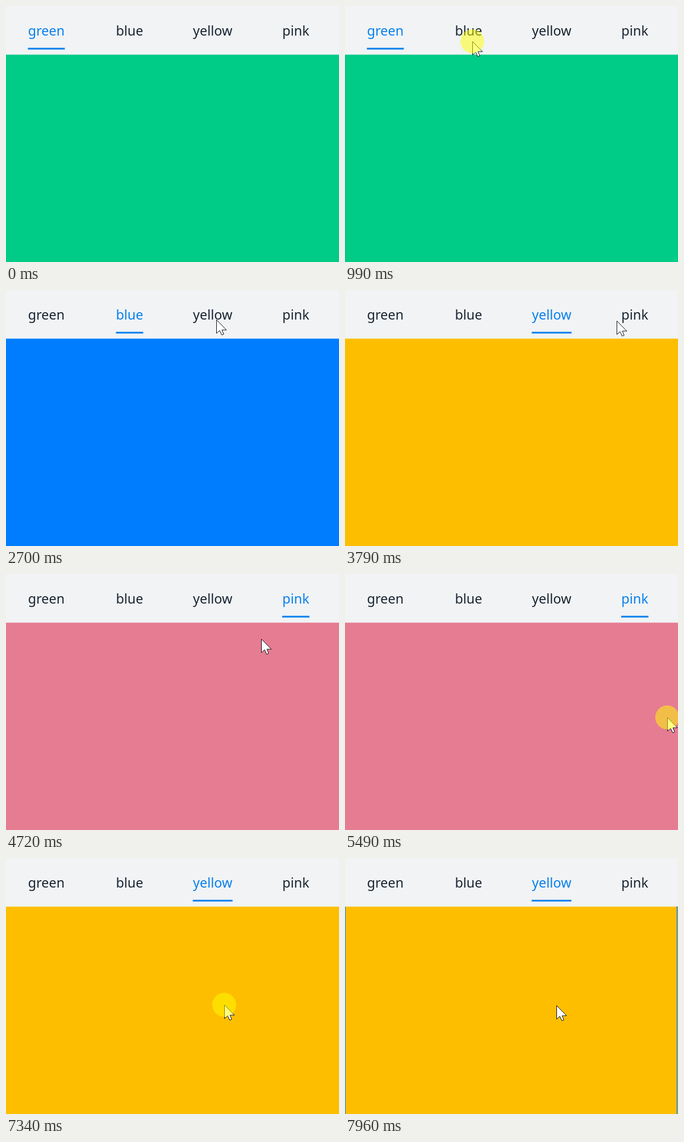
Recreate the animation shown at these times as an HTML page. Size 586 by 450 pixels, loop 8 s.

```html
<!DOCTYPE html>
<html lang="en">
<head>
<meta charset="utf-8">
<title>Swipeable tabs</title>
<style>
  html, body { margin: 0; width: 100%; height: 100%; overflow: hidden; }
  svg { display: block; width: 586px; height: 450px; }
  text { font: 23.4px "Noto Sans", "Open Sans", sans-serif; text-anchor: middle; fill: #182431; }
  text.active { font-weight: 500; fill: #087fee; }
</style>
</head>
<body>
<svg viewBox="0 0 586 450">
  <rect width="586" height="450" fill="#f1f3f5"/>
  <g id="pages"></g>
  <rect id="sliver" x="583" y="85" width="3" height="365"/>
  <g id="labels"></g>
  <rect id="bar" y="73.5" height="3" fill="#087fee"/>
  <path id="cursor" d="M.5 .5V24.2L6 19.2 9.7 27 13.2 25.6 10 18.2H17.9Z"
    fill="#fff" stroke="#111" stroke-linejoin="round"/>
  <circle id="press" r="21" fill="#ff0" fill-opacity="0.5"/>
</svg>
<script>
const LOOP = 8000, START = 70, TICK = 77.35;
const WIDTH = 586, TOP = 85.5;

const tabs = [
  { name: "green",  color: "#00cb87", x: 38.5,  w: 65 },
  { name: "blue",   color: "#007dff", x: 193.5, w: 48 },
  { name: "yellow", color: "#febe00", x: 328.7, w: 70 },
  { name: "pink",   color: "#e67c92", x: 486,   w: 48 }
];

const clicks = [[12, 13], [28, 30], [46, 48]];
const drags = [[66, 72], [87, 95]];
const away = [72, 77];
const SLIDE_DELAY = 5;

// pointer legs: start, end, target x and y
const legs = [
  [0, 10, 224, 62],
  [19, 23, 339, 52],
  [30, 43, 478, 54],
  [59, 60, 449, 114],
  [60, 64, 335, 205],
  [66, 70, 567, 252],
  [77, 82, 253, 244],
  [87, 92, 384, 258],
  [98, 102, 372, 259]
];

const $ = id => document.getElementById(id);
const lerp = (a, b, k) => a + (b - a) * k;
const ease = k => k * k * (3 - 2 * k);
const ramp = (n, from, length) => Math.min(1, Math.max(0, (n - from) / length));
const within = (n, [from, to]) => n >= from && n < to;
const show = (el, on) => el.setAttribute("visibility", on ? "visible" : "hidden");

function set(el, attrs) {
  for (const key in attrs) el.setAttribute(key, attrs[key]);
  return el;
}

function add(parent, tag, attrs) {
  const el = document.createElementNS("http://www.w3.org/2000/svg", tag);
  return parent.appendChild(set(el, attrs));
}

for (const tab of tabs) {
  tab.page = add($("pages"), "rect",
    { y: TOP, width: WIDTH, height: 450 - TOP, fill: tab.color });
  tab.label = add($("labels"), "text", { x: tab.x + tab.w / 2, y: 52 });
  tab.label.textContent = tab.name;
}

// Positions of pages and underline, both counted in tabs.
function position(n) {
  let page = 0, bar = 0;
  for (const [, release] of clicks) {
    // a slide is already well under way when it first shows
    const age = n - release - SLIDE_DELAY;
    const k = age < 0 ? 0 : Math.min(1, 0.635 + age * 0.35);
    page += 1 - (1 - k) ** 3.12;
    bar += k;
  }
  const swipe = ramp(n, 71.25, 4.96);
  const pull = 0.224 * ease(ramp(n, 94, 2)) * (1 - ramp(n, 98, 5)) ** 3;
  return [page - ease(swipe) - pull, bar - swipe ** 1.4 - pull];
}

function pointer(n) {
  let x = 455, y = 394;
  for (const [from, to, toX, toY] of legs) {
    const k = ease(ramp(n, from, to - from));
    x = lerp(x, toX, k);
    y = lerp(y, toY, k);
  }
  return [Math.round(x), Math.round(y)];
}

function draw(t) {
  const n = Math.floor((t - START) / TICK + 0.15);
  const [page, bar] = position(n);

  tabs.forEach((tab, i) => {
    tab.page.setAttribute("x", (i - page) * WIDTH);
    tab.label.setAttribute("class", i === Math.round(bar) ? "active" : "");
  });

  // while sliding, the right edge keeps the colour of the left page
  const left = Math.floor(page);
  const rest = (left + 1 - page) * WIDTH;
  show($("sliver"), rest < WIDTH);
  set($("sliver"), { fill: tabs[left].color, "fill-opacity": Math.min(1, rest / 2) });

  const from = Math.floor(bar), a = tabs[from], b = tabs[from + 1] || a;
  set($("bar"), { x: lerp(a.x, b.x, bar - from), width: lerp(a.w, b.w, bar - from) });

  const place = { transform: `translate(${pointer(n)})` };
  show(set($("cursor"), place), n >= 0 && !within(n, away));
  show(set($("press"), place), [...clicks, ...drags].some(span => within(n, span)));
}

const begin = performance.now();
function frame() {
  draw((performance.now() - begin) % LOOP);
  requestAnimationFrame(frame);
}
frame();
</script>
</body>
</html>
```
